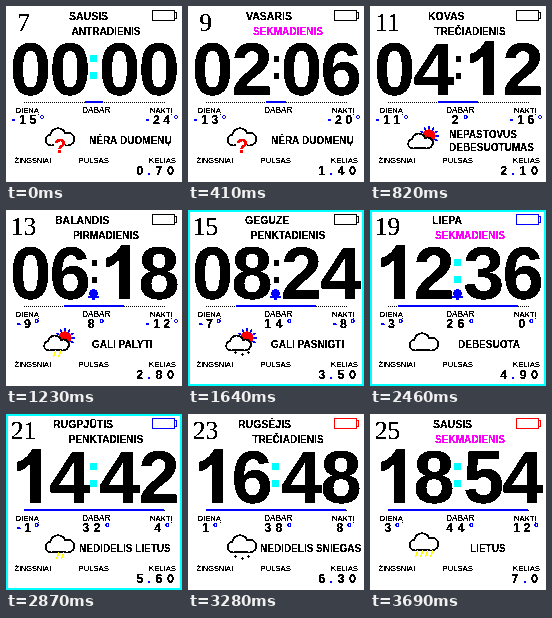
These frames come from a looping animation (176x176 px, 4.1 s). An HTML page with a canvas:

```html
<!DOCTYPE html>
<html lang="lt">
<head>
<meta charset="utf-8">
<style>
  html, body { margin: 0; width: 100%; height: 100%; overflow: hidden; background: #fff; }
  canvas { display: block; width: 176px; height: 176px; image-rendering: pixelated; }
</style>
</head>
<body>
<canvas id="face" width="176" height="176"></canvas>
<script>
const STEP = 410, STEPS = 10;
const BLACK = '#000', WHITE = '#fff', RED = '#f00', BLUE = '#00f', CYAN = '#0ff', YELLOW = '#ff0', MAGENTA = '#f0f';
const SANS = '"Liberation Sans", Arial, sans-serif';
const SERIF = '"Liberation Serif", serif';
const bold = size => `bold ${size}px ${SANS}`;

const months = [['SAUSIS', 63], ['VASARIS', 58], ['KOVAS', 58], ['BALANDIS', 49], ['GEGUZE', 57],
  ['BIRŽELIS', 52], ['LIEPA', 62], ['RUGPJŪTIS', 47], ['RUGSĖJIS', 50], ['SAUSIS', 63]];
const weekdays = ['ANTRADIENIS', 'SEKMADIENIS', 'TREČIADIENIS', 'PIRMADIENIS', 'PENKTADIENIS',
  'TREČIADIENIS', 'SEKMADIENIS', 'PENKTADIENIS', 'TREČIADIENIS', 'SEKMADIENIS'];
const noData = { icon: unknown, x: 83, lines: ['NĖRA DUOMENŲ'] };
const weather = [
  noData, noData,
  { icon: () => sunCloud(136), x: 79, lines: ['NEPASTOVUS', 'DEBESUOTUMAS'] },
  { icon: () => { sunCloud(134); rain(51, 140, 2); }, x: 86, lines: ['GALI PALYTI'] },
  { icon: () => { sunCloud(134); snow(); }, x: 83, lines: ['GALI PASNIGTI'] },
  { icon: () => sun(57, 134, 7, 14, YELLOW), x: 92, lines: ['GIEDRA', 'IR SAULĖTA'] },
  { icon: () => cloud(54, 133), x: 88, lines: ['DEBESUOTA'] },
  { icon: () => { cloud(54, 131); rain(54, 138, 2); }, x: 73, lines: ['NEDIDELIS LIETUS'] },
  { icon: () => { cloud(54, 131); snow(); }, x: 72, lines: ['NEDIDELIS SNIEGAS'] },
  { icon: () => { cloud(54, 129); rain(54, 136, 4); }, x: 100, lines: ['LIETUS'] },
];

const canvas = document.getElementById('face');
const c = canvas.getContext('2d', { willReadFrequently: true });

function rect(x, y, w, h, color) {
  c.fillStyle = color;
  c.fillRect(x, y, w, h);
}

function disc(x, y, r, color) {
  c.fillStyle = color;
  c.beginPath();
  c.arc(x, y, r, 0, 7);
  c.fill();
}

function line(x1, y1, x2, y2, color, width) {
  c.strokeStyle = color;
  c.lineWidth = width;
  c.beginPath();
  c.moveTo(x1, y1);
  c.lineTo(x2, y2);
  c.stroke();
}

function text(str, x, y, font, color = BLACK, align = 'left') {
  c.font = font;
  c.fillStyle = color;
  c.textAlign = align;
  c.fillText(str, x, y);
}

// Wide-set glyphs; signs are blue, digits black.
function spaced(str, x, y, gap, anchor) {
  const font = bold(12.5);
  c.font = font;
  const widths = [...str].map(ch => c.measureText(ch).width + gap);
  x -= (widths.reduce((a, b) => a + b) - gap) * anchor;
  [...str].forEach((ch, i) => {
    text(ch, x, y, font, '-.°'.includes(ch) ? BLUE : BLACK);
    x += widths[i];
  });
}

// A "1" without a foot, centred on x.
function one(x) {
  c.fillStyle = BLACK;
  c.fill(new Path2D(`M${x + 10} 89h-10.5v-39q-5.5 5.5-12.5 7.5v-9.5q11-4 14.5-13h8.5z`));
}

function clockDigits(value, x) {
  [...two(value)].forEach((d, i) => {
    const mid = x + 39.5 * i;
    if (d === '1') one(mid);
    else text(d, mid, 89, bold(74), BLACK, 'center');
  });
}

function two(v) {
  return String(v).padStart(2, '0');
}

function cloud(x, y, k = 1) {
  const puffs = [[-9, 2, 4.5], [-2, -2, 7], [8, 1, 5.5]];
  for (const [grow, color] of [[1.6, BLACK], [0, WHITE]]) {
    for (const [dx, dy, r] of puffs) disc(x + dx * k, y + dy * k, r * k + grow, color);
    rect(x - 9 * k, y, 17 * k, 6.5 * k + grow, color);
  }
}

function sun(x, y, r, reach, rays) {
  for (let i = 0; i < 12; i++) {
    const a = i * Math.PI / 6, cos = Math.cos(a), sin = Math.sin(a);
    line(x + cos * r, y + sin * r, x + cos * reach, y + sin * reach, rays, 1.4);
  }
  disc(x, y, r, RED);
}

function sunCloud(y) {
  sun(59, y - 6, 6.5, 10, BLUE);
  cloud(50.5, y, .85);
}

function rain(mid, y, count) {
  for (let i = 0; i < count; i++) {
    const x = mid + (i - (count - 1) / 2) * 5;
    line(x + 1.5, y, x - 1, y + 7, YELLOW, 1.1);
  }
}

function snow() {
  for (const [x, y] of [[47, 142], [54, 144], [60, 142]]) {
    rect(x - 1, y, 3, 1, BLACK);
    rect(x, y - 1, 1, 3, BLACK);
  }
}

function unknown() {
  cloud(54, 132);
  rect(48, 138, 11, 4, WHITE);
  text('?', 54, 147, bold(20), RED, 'center');
}

function bell() {
  disc(87.5, 83.5, 4, BLUE);
  rect(84, 83, 7, 4, BLUE);
  rect(82, 86, 11, 2, BLUE);
  rect(86, 88, 3, 2, BLUE);
}

function battery(color) {
  c.strokeStyle = color;
  c.lineWidth = 1;
  c.strokeRect(146.5, 4.5, 22, 10);
  c.strokeRect(168.5, 6.5, 2, 6);
}

function labels() {
  const font = `7.7px ${SANS}`;
  text('DIENĄ', 9.5, 107, font);
  text('DABAR', 76, 107, `8.3px ${SANS}`);
  text('NAKTĮ', 144, 107, font);
  text('ŽINGSNIAI', 8.5, 157, `7.3px ${SANS}`);
  text('PULSAS', 72.5, 157, font);
  text('KELIAS', 143, 157, font);
}

// Reduce to the eight pure colours of the display.
function snap() {
  const image = c.getImageData(0, 0, 176, 176), d = image.data;
  for (let i = 0; i < d.length; i++) d[i] = d[i] > 165 ? 255 : 0;
  c.putImageData(image, 0, 0);
}

function draw(n) {
  rect(0, 0, 176, 176, WHITE);

  text(7 + 2 * n, 17.5, 25, `25.5px ${SERIF}`, BLACK, 'center');
  text(months[n][0], months[n][1], 14, bold(10.5));
  text(weekdays[n], 100, 29, bold(10.1), weekdays[n] === 'SEKMADIENIS' ? MAGENTA : BLACK, 'center');
  battery(n < 6 ? BLACK : n < 8 ? BLUE : RED);

  clockDigits(2 * n, 24.5);
  clockDigits(6 * n, 113.5);
  const linked = n > 0 && n < 5;
  for (const y of [49, 66]) {
    if (linked) rect(86, y + 1, 5, 6, BLACK);
    else rect(84, y, 7, 7, CYAN);
  }
  if (n > 2 && n < 7) bell();

  for (let x = 18; x < 159; x += 2) rect(x, 96, 1, 1, BLACK);
  const half = Math.min(70, Math.max(9, 10 * n));
  rect(88 - half, 95, 2 * half, 2, BLUE);

  labels();
  spaced(`${2 * n - 15}°`, 22, 118, 3.3, .5);
  if (n > 1) spaced(`${6 * n - 10}°`, 90, 118, 4.3, .5);
  spaced(`${4 * n - 24}°`, 156, 118, 3.3, .5);

  const { icon, x, lines } = weather[n];
  icon();
  lines.forEach((s, i) => text(s, x, (lines.length > 1 ? 132 : 138) + 13 * i, bold(10)));
  spaced(n < 9 ? (.7 * (n + 1)).toFixed(2) : '7.0', 168, 169, 4.5, 1);

  if (n > 3 && n < 8) {
    c.strokeStyle = CYAN;
    c.lineWidth = 2;
    c.strokeRect(1, 1, 174, 174);
  }
  snap();
}

let shown = -1;
const start = performance.now();
function tick() {
  const n = Math.floor(Math.max(0, performance.now() - start) / STEP) % STEPS;
  if (n !== shown) draw(shown = n);
  requestAnimationFrame(tick);
}
tick();
</script>
</body>
</html>
```
